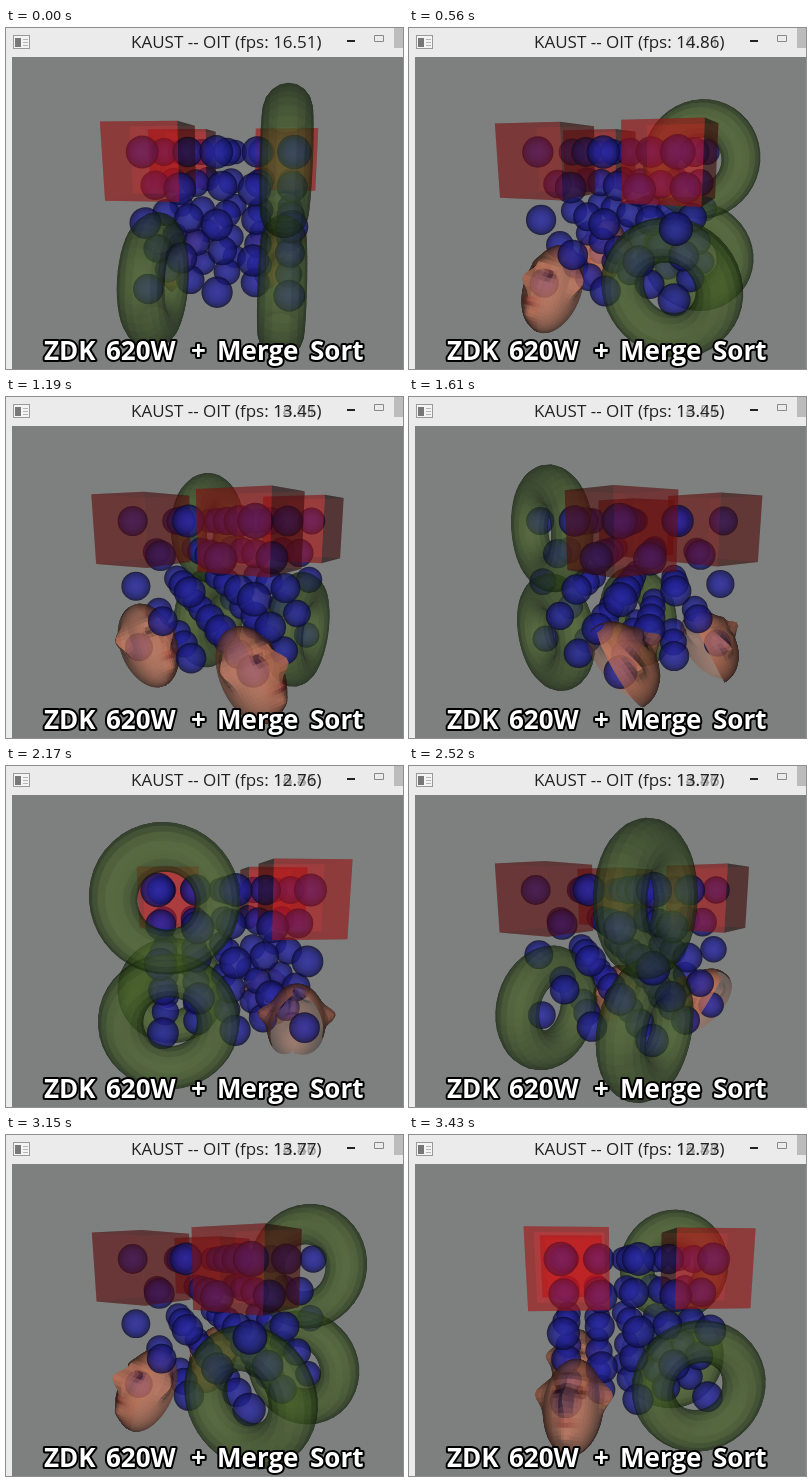
Recreate the animation shown at these times as an HTML page with a canvas. Size 397x341 px, loop 3.5 s.

```html
<!DOCTYPE html>
<html lang="en">
<head>
<meta charset="utf-8">
<title>KAUST -- OIT</title>
<style>
html, body { margin: 0; width: 100%; height: 100%; overflow: hidden; background: #ebebeb; }
canvas, svg { position: absolute; left: 0; top: 0; width: 397px; height: 341px; display: block; }
.title { font: 17px "Open Sans", "Noto Sans", sans-serif; fill: #222; }
.title .hide { fill: none; }
.caption {
  font: bold 26px "Open Sans", "Noto Sans", sans-serif;
  fill: #fff; stroke: #000; stroke-width: 4px; stroke-linejoin: round; paint-order: stroke;
}
</style>
</head>
<body>
<canvas id="view" width="397" height="341"></canvas>
<svg viewBox="0 0 397 341">
  <g>
    <rect x="7.5" y="7.5" width="16" height="13" fill="#f4f4f4" stroke="#9a9a9a"/>
    <rect x="9" y="10" width="6" height="9" fill="#777"/>
    <path d="M17 11.500h5M17 14.500h5M17 17.500h5" stroke="#b5b5b5"/>
    <rect x="341" y="12" width="8" height="2" fill="#222"/>
    <path d="M368.500 7.500h9v6h-9z" fill="none" stroke="#8a8a8a"/>
    <rect x="388" y="0" width="9" height="20" fill="#bcbcbc"/>
  </g>
  <g id="ghosts" class="title" opacity=".33"></g>
  <text id="title" class="title" x="125" y="20"></text>
  <g class="caption">
    <text x="38" y="332">ZDK</text>
    <text x="100" y="332">620W</text>
    <text x="185" y="332">+</text>
    <text x="211" y="332">Merge</text>
    <text x="304" y="332">Sort</text>
  </g>
</svg>
<script>
const W = 397, H = 341, LOOP = 3500, STEP = 70;
const ctx = document.getElementById("view").getContext("2d");
const sheet = document.createElement("canvas");
sheet.width = W;
sheet.height = H;
const ink = sheet.getContext("2d");

// time in ms, turn of the scene in degrees
const turns = [[0, -8], [560, 69.5], [1190, 149], [1610, 220], [2170, 276.5], [2870, 377], [3430, 456.5], [3500, 466]];
const rates = [[0, "16.51"], [350, "14.86"], [980, "13.45"], [1750, "12.76"], [2520, "13.77"], [3430, "12.73"]];

// camera
const FOCAL = 405, DIST = 6.25, PITCH = 12.5 * Math.PI / 180;
const CP = Math.cos(PITCH), SP = Math.sin(PITCH);
const CX = 221, CY = 124 + FOCAL * SP / CP;
let cosT = 1, sinT = 0;

function toCamera([a, y, b]) {
  const x = a * cosT + b * sinT;
  const d = DIST + a * sinT - b * cosT;
  return [x, y * CP - d * SP, d * CP + y * SP];
}
const toScreen = ([x, y, z]) => [CX + FOCAL * x / z, CY + FOCAL * y / z];

const sub = (p, q) => p.map((v, i) => v - q[i]);
const dot = (p, q) => p[0] * q[0] + p[1] * q[1] + p[2] * q[2];
const cross = (p, q) => [p[1] * q[2] - p[2] * q[1], p[2] * q[0] - p[0] * q[2], p[0] * q[1] - p[1] * q[0]];
const mid = ps => [0, 1, 2].map(i => ps.reduce((s, p) => s + p[i], 0) / ps.length);
const rgb = c => `rgb(${c.map(v => Math.max(0, Math.min(255, Math.round(v)))).join()})`;
const bump = (x, y, w, h) => Math.exp(-x * x / (w * w) - y * y / (h * h));

// cosine between a quad's normal and the view ray, negative when it faces the eye
function facing(q, c) {
  const n = cross(sub(q[2], q[0]), sub(q[3], q[1]));
  return dot(n, c) / (Math.sqrt(dot(n, n) * dot(c, c)) || 1);
}

function trace(g, q) {
  g.beginPath();
  q.forEach(p => g.lineTo(...toScreen(p)));
  g.closePath();
}

function grid(nu, nv, u0, u1, v0, v1, point) {
  const at = (i, j) => point(u0 + (u1 - u0) * i / nu, v0 + (v1 - v0) * j / nv);
  const quads = [];
  for (let i = 0; i < nu; i++)
    for (let j = 0; j < nv; j++)
      quads.push({
        pts: [at(i, j), at(i + 1, j), at(i + 1, j + 1), at(i, j + 1)],
        u: u0 + (u1 - u0) * (i + 0.5) / nu,
        v: v0 + (v1 - v0) * (j + 0.5) / nv
      });
  return quads;
}

function torus(a, y, b) {
  const ring = 0.66, tube = 0.29, tau = Math.PI * 2;
  return {
    at: [a, y, b], reach: 0.3, back: 0.36, front: 0.56,
    quads: grid(44, 18, 0, tau, 0, tau, (u, v) => {
      const r = ring + tube * Math.cos(v);
      return [a + tube * Math.sin(v), y + r * Math.sin(u), b + r * Math.cos(u)];
    }),
    tone: k => [14 + 60 * k ** 1.5, 24 + 74 * k ** 1.3, 8 + 34 * k ** 1.5]
  };
}

// a face mask, open behind, leaning back so that it looks upwards
function head(a, y, b) {
  const lean = 0.55, yaw = 0.2;
  const eyes = (u, v) => bump(u - 0.42, v - 0.2, 0.2, 0.1) + bump(u + 0.42, v - 0.2, 0.2, 0.1);
  const mouth = (u, v) => bump(u, v + 0.46, 0.36, 0.07);
  return {
    at: [a, y, b], reach: 0.25, back: 0.4, front: 0.74,
    quads: grid(34, 30, -2, 2, -1.5, 1.35, (u, v) => {
      const nose = bump(u, v + 0.06, 0.16, 0.2) * 0.19 + bump(u, v - 0.15, 0.1, 0.2) * 0.07;
      const chin = bump(u, v + 0.85, 0.4, 0.2) * 0.1;
      const brow = bump(u, v - 0.42, 0.7, 0.12) * 0.06;
      const ear = bump(Math.abs(u) - 1.45, v - 0.25, 0.16, 0.26) * 0.17;
      const depth = 0.46 + nose + chin + brow - eyes(u, v) * 0.07 + mouth(u, v) * 0.03;
      const c = Math.cos(v);
      const out = depth * c * Math.cos(u), down = -0.66 * Math.sin(v);
      const side = (0.4 + ear) * c * Math.sin(u);
      const fore = out * Math.cos(lean) + down * Math.sin(lean);
      return [
        a - fore * Math.cos(yaw) - side * Math.sin(yaw),
        y + down * Math.cos(lean) - out * Math.sin(lean),
        b - fore * Math.sin(yaw) + side * Math.cos(yaw)
      ];
    }),
    tone: (k, q) => {
      const e = eyes(q.u, q.v), m = mouth(q.u, q.v), l = k ** 1.6;
      return [44 + 158 * l - 70 * e - 15 * m, 24 + 94 * l - 55 * e - 45 * m, 18 + 72 * l - 42 * e - 32 * m];
    }
  };
}

function cube(a, y, b) {
  const h = 0.48, faces = [];
  for (let axis = 0; axis < 3; axis++)
    for (const side of [-h, h])
      faces.push([[-h, -h], [-h, h], [h, h], [h, -h]].map(([p, q]) => {
        const o = [0, 0, 0];
        o[axis] = side;
        o[(axis + 1) % 3] = p * Math.sign(side);
        o[(axis + 2) % 3] = q;
        return [a + o[0], y + o[1], b + o[2]];
      }));
  return faces;
}

const C = 0.88;
const meshes = [
  torus(C, 0.14, C), torus(C, 1.77, C), torus(-C, 1.77, C),
  head(-C, 1.98, -C), head(C, 1.86, -C)
];
const cubeFaces = [[C, -C], [-C, -C], [-C, C]].flatMap(([a, b]) => cube(a, 0.12, b));

// face-centred lattice, two cells along each side
const balls = [];
for (let i = -2; i <= 2; i++)
  for (let j = 0; j <= 4; j++)
    for (let k = -2; k <= 2; k++)
      if ((i + j + k) % 2 === 0) balls.push([i * 0.49, j * 0.47, k * 0.49]);

function drawBall(c) {
  const [x, y] = toScreen(c), r = 0.215 * FOCAL / c[2];
  const g = ctx.createRadialGradient(x, y, 0, x, y, r);
  g.addColorStop(0, "#2c2ca8");
  g.addColorStop(0.5, "#222292");
  g.addColorStop(0.85, "#151562");
  g.addColorStop(1, "#080828");
  ctx.globalAlpha = 0.8;
  ctx.fillStyle = g;
  ctx.beginPath();
  ctx.arc(x, y, r, 0, Math.PI * 2);
  ctx.fill();
}

function drawFace(q, f) {
  const k = Math.abs(f) ** 2.4;
  ctx.globalAlpha = f < 0 ? 0.5 : 0.25;
  ctx.fillStyle = rgb([22 + 178 * k, 8 + 14 * k, 6 + 18 * k]);
  trace(ctx, q);
  ctx.fill();
}

function drawSheet(quads, alpha) {
  ink.clearRect(0, 0, W, H);
  quads.sort((p, q) => q.c[2] - p.c[2]);
  for (const q of quads) {
    ink.fillStyle = ink.strokeStyle = q.color;
    trace(ink, q.pts);
    ink.fill();
    ink.stroke();
  }
  ctx.globalAlpha = alpha;
  ctx.drawImage(sheet, 0, 0);
}

function drawScene(angle) {
  cosT = Math.cos(angle);
  sinT = Math.sin(angle);
  const items = [];

  for (const b of balls) {
    const c = toCamera(b);
    items.push({ z: c[2], draw: () => drawBall(c) });
  }
  for (const face of cubeFaces) {
    const q = face.map(toCamera), c = mid(q), f = facing(q, c);
    items.push({ z: c[2], draw: () => drawFace(q, f) });
  }
  // far and near halves are laid down apart, so that balls can sit between them
  for (const m of meshes) {
    const near = [], far = [], z = toCamera(m.at)[2];
    for (const quad of m.quads) {
      const pts = quad.pts.map(toCamera), c = mid(pts), f = facing(pts, c);
      (f < 0 ? near : far).push({ pts, c, color: rgb(m.tone(Math.abs(f), quad)) });
    }
    items.push({ z: z + m.reach, draw: () => drawSheet(far, m.back) });
    items.push({ z: z - m.reach, draw: () => drawSheet(near, m.front) });
  }

  ctx.globalAlpha = 1;
  ctx.fillStyle = "#ebebeb";
  ctx.fillRect(0, 0, W, H);
  ctx.save();
  ctx.beginPath();
  ctx.rect(6, 29, W - 6, H - 29);
  ctx.clip();
  ctx.fillStyle = "#7d807e";
  ctx.fillRect(0, 0, W, H);
  items.sort((p, q) => q.z - p.z).forEach(i => i.draw());
  ctx.restore();
}

const titleText = document.getElementById("title");
const ghosts = document.getElementById("ghosts");
const LEAD = "KAUST -- OIT (fps: ";

function drawTitle(t) {
  const seen = rates.filter(r => r[0] <= t).map(r => r[1]);
  titleText.textContent = LEAD + seen.pop() + ")";
  ghosts.innerHTML = seen.map(v => `<text x="125" y="20"><tspan class="hide">${LEAD}</tspan>${v}</text>`).join("");
}

function angleAt(t) {
  const i = turns.findIndex(k => k[0] > t);
  const [t0, a0] = turns[i - 1], [t1, a1] = turns[i];
  return (a0 + (a1 - a0) * (t - t0) / (t1 - t0)) * Math.PI / 180;
}

let start = null, shown = -1;
function tick(now) {
  if (start === null) start = now;
  const t = Math.floor(((now - start) % LOOP) / STEP) * STEP;
  if (t !== shown) {
    shown = t;
    drawScene(angleAt(t));
    drawTitle(t);
  }
  requestAnimationFrame(tick);
}
requestAnimationFrame(tick);
</script>
</body>
</html>
```
